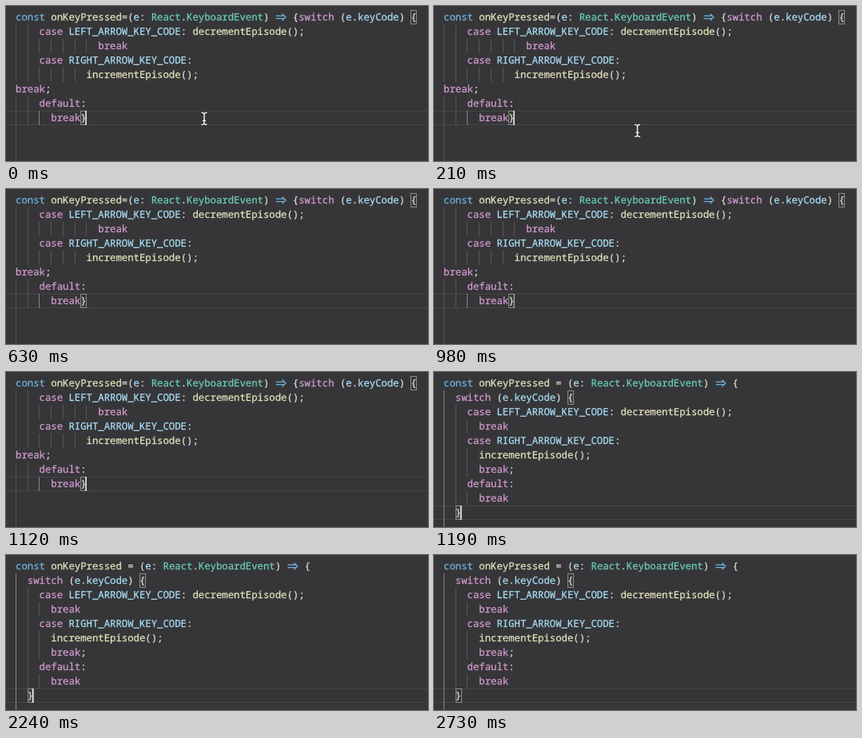
An HTML page that plays this animation: 528 px wide and 194 px high, repeating every 3.15 s.

```html
<!DOCTYPE html>
<html lang="en">
<head>
<meta charset="utf-8">
<title>Format on save</title>
<style>
  html, body { margin: 0; width: 100%; height: 100%; overflow: hidden; background: #363638; }
  svg { display: block; }
  text {
    font: 500 12.3px "Noto Sans Mono", "DejaVu Sans Mono", monospace;
    font-variant-ligatures: none;
    text-rendering: geometricPrecision;
    white-space: pre;
    stroke-width: .25px;
  }
</style>
</head>
<body>
<svg id="stage" width="528" height="194" viewBox="0 0 528 194">
  <rect width="528" height="194" fill="#363638"/>
  <g id="messy"></g>
  <g id="tidy"></g>
  <rect id="caret" width="1.6" height="18" fill="#e4e4e2"/>
  <g id="pointer" fill="none" stroke-linecap="round">
    <path d="M-3 -7.5Q-.3 -7.5 0 -5.5Q.3 -7.5 3 -7.5M0 -5.5V5.5M-3 7.5Q-.3 7.5 0 5.5Q.3 7.5 3 7.5M-1.5 2.5H1.5" stroke="#2a2a2c" stroke-width="2.6"/>
    <path d="M-3 -7.5Q-.3 -7.5 0 -5.5Q.3 -7.5 3 -7.5M0 -5.5V5.5M-3 7.5Q-.3 7.5 0 5.5Q.3 7.5 3 7.5M-1.5 2.5H1.5" stroke="#f4f4f4" stroke-width="1.5"/>
  </g>
</svg>
<script>
const NS = "http://www.w3.org/2000/svg";
const LEFT = 12, TOP = 5, CHAR = 7.38, ROW = 18;
const LOOP = 3150, STEP = 70, FORMAT_AT = 1190;
const $ = id => document.getElementById(id);
const colX = col => LEFT + col * CHAR;
const rowY = row => TOP + row * ROW;

function add(parent, tag, attrs) {
  const el = document.createElementNS(NS, tag);
  for (const key in attrs) el.setAttribute(key, attrs[key]);
  return parent.appendChild(el);
}

const BLUE = "#6fb3e0";
const RULES = [
  [/^const$/, BLUE],
  [/^(switch|case|break|default)$/, "#d59bd2"],
  [/^(React|KeyboardEvent)$/, "#6bcfb9"],
  [/^(onKeyPressed|\w+Episode)$/, "#e6e4bd"],
  [/^\w+$/, "#aadff8"]
];

function tint(word) {
  const rule = RULES.find(([pattern]) => pattern.test(word));
  return rule ? rule[1] : "#dededc";
}

// The two-character arrow is drawn as one ligature.
function arrow(parent, col, row) {
  const x = colX(col), y = rowY(row) + 9;
  add(parent, "path", {
    d: `M${x + 1} ${y - 1.7}H${x + 11.2}M${x + 1} ${y + 1.7}H${x + 11.2}M${x + 8.8} ${y - 4.2}L${x + 13.3} ${y}L${x + 8.8} ${y + 4.2}`,
    fill: "none", stroke: BLUE, "stroke-width": 1.2
  });
}

function writeLine(parent, line, row) {
  for (const match of line.matchAll(/=>|\w+|[^\w\s]/g)) {
    const word = match[0], color = tint(word);
    if (word === "=>") { arrow(parent, match.index, row); continue; }
    add(parent, "text", { x: colX(match.index), y: rowY(row) + 12.7, fill: color, stroke: color })
      .textContent = word;
  }
}

function guide(parent, col, from, to, color = "#555557") {
  add(parent, "rect", {
    x: Math.round(colX(col) - .2), y: rowY(from), width: 1, height: (to - from) * ROW, fill: color
  });
}

function bracket(parent, col, row) {
  add(parent, "rect", {
    x: Math.round(colX(col)) + .5, y: rowY(row) + .5, width: 7, height: 17,
    fill: "#343b35", stroke: "#8b8b8b"
  });
}

function currentLine(parent, row) {
  for (const y of [rowY(row), rowY(row + 1) - 1])
    add(parent, "rect", { x: 0, y, width: 528, height: 1, fill: "#454547" });
}

function build(id, { lines, active, guides, brackets }) {
  const group = $(id);
  currentLine(group, active);
  guides.forEach(g => guide(group, ...g));
  brackets.forEach(b => bracket(group, ...b));
  lines.forEach((line, row) => writeLine(group, line, row));
}

const BRIGHT = "#858587";

build("messy", {
  lines: [
    "const onKeyPressed=(e: React.KeyboardEvent) => {switch (e.keyCode) {",
    "    case LEFT_ARROW_KEY_CODE: decrementEpisode();",
    "              break",
    "    case RIGHT_ARROW_KEY_CODE:",
    "            incrementEpisode();",
    "break;",
    "    default:",
    "      break}"
  ],
  active: 7,
  guides: [
    [0, 1, 5], [0, 6, 11], [2, 1, 5], [2, 6, 8],
    ...[4, 6, 8, 10, 12].map(col => [col, 2, 3]),
    ...[4, 6, 8, 10].map(col => [col, 4, 5]),
    [4, 7, 8, BRIGHT]
  ],
  brackets: [[67, 0], [11, 7]]
});

build("tidy", {
  lines: [
    "const onKeyPressed = (e: React.KeyboardEvent) => {",
    "  switch (e.keyCode) {",
    "    case LEFT_ARROW_KEY_CODE: decrementEpisode();",
    "      break",
    "    case RIGHT_ARROW_KEY_CODE:",
    "      incrementEpisode();",
    "      break;",
    "    default:",
    "      break",
    "  }"
  ],
  active: 9,
  guides: [[0, 1, 11, BRIGHT], [2, 2, 9], [4, 3, 4], [4, 5, 7], [4, 8, 9]],
  brackets: [[21, 1], [2, 9]]
});

const ramp = (t, from, to) => Math.min(1, Math.max(0, (t - from) / (to - from)));

function caretAlpha(t) {
  if (t < FORMAT_AT) return 1 - ramp(t, 350, 560) + ramp(t, 910, 1120);
  return 1 - ramp(t, 1470, 1680) + ramp(t, 2030, 2240) - ramp(t, 2590, 2730);
}

function draw(time) {
  const t = Math.floor((time % LOOP) / STEP) * STEP;
  const tidy = t >= FORMAT_AT;
  $("messy").setAttribute("visibility", tidy ? "hidden" : "visible");
  $("tidy").setAttribute("visibility", tidy ? "visible" : "hidden");

  const caret = $("caret");
  caret.setAttribute("x", colX(tidy ? 3 : 12) - 1.4);
  caret.setAttribute("y", rowY(tidy ? 9 : 7));
  caret.setAttribute("opacity", caretAlpha(t));

  const k = t / 210;
  const pointer = $("pointer");
  pointer.setAttribute("visibility", t < 490 ? "visible" : "hidden");
  pointer.setAttribute("transform", `translate(${248 + 6.5 * k} ${141 + 15 * k * k})`);
}

const start = performance.now();
function tick() {
  draw(performance.now() - start);
  requestAnimationFrame(tick);
}
draw(0);
requestAnimationFrame(tick);
</script>
</body>
</html>
```
